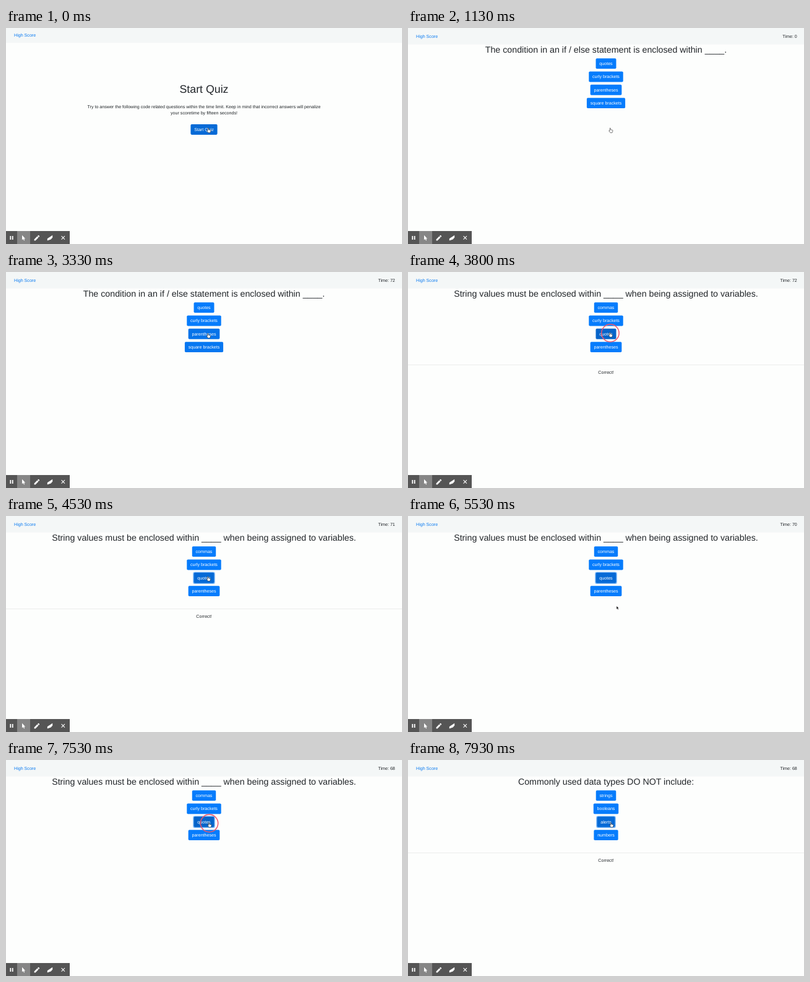
These frames come from a looping animation (640 px wide and 350 px high, 8000 ms). An HTML page:

```html
<!DOCTYPE html>
<html lang="en">
<head>
<meta charset="utf-8">
<title>Quiz</title>
<style>
  html, body { margin: 0; width: 100%; height: 100%; overflow: hidden; background: #fdfefd; }
  svg { display: block; width: 100vw; height: 100vh; }
  text { font: 7.11px "Liberation Sans", Arial, sans-serif; fill: #212529; text-anchor: middle; text-rendering: geometricPrecision; }
  .title { font-size: 17.78px; }
  .question { font-size: 14.22px; }
  .label { fill: #fff; }
  .link { fill: #0b7bf0; text-anchor: start; }
  .end { text-anchor: end; }
</style>
</head>
<body>
<svg id="stage" viewBox="0 0 640 350">
  <rect width="640" height="350" fill="#fdfefd"/>
  <rect id="bar" width="640" height="24" fill="#f4f7f7"/>
  <text id="link" class="link" x="13" y="14.4">High Score</text>
  <text id="timer" class="end" x="628.8" y="15.8"></text>
  <g id="scenes"></g>
  <g id="feedback">
    <rect y="150" width="640" height="1" fill="#ebecec"/>
    <text x="320" y="164.9">Correct!</text>
  </g>
  <g id="toolbar">
    <rect y="329" width="103" height="21" fill="#555"/>
    <rect x="18" y="329" width="21" height="21" fill="#868686"/>
    <g fill="#fff">
      <path d="M6.4 337h1.8v6h-1.8zM9.8 337h1.8v6h-1.8z"/>
      <path d="M26 335.8v7.6l1.8-1.6 1.2 2.8 1.2-.5-1.2-2.7h2.3z"/>
      <path d="M45.6 344.4v-2l4.9-4.9 2 2-4.9 4.9zM51 337l1-1q.5-.4 1 0l1 1q.4.5 0 1l-1 1z"/>
      <path d="M66.8 341.2l8.4-5.4v3.6l-2.6 3-5.8 2.2z"/>
    </g>
    <path d="M89.6 337.2l5.4 5.4M95 337.2l-5.4 5.4" stroke="#fff" stroke-width="1.1"/>
  </g>
  <circle id="halo" r="14.2" fill="none" stroke="#f0566a" stroke-width="1.5"/>
  <g id="cursor" stroke-linejoin="round">
    <path id="arrow" d="M0 0v5.4l1.3-1.1.9 2 1-.4-.9-2h1.7z" fill="#000" stroke="#fff" stroke-width=".5"/>
    <path id="hand" d="M-.7.5q.7-.9 1.3 0v2.2l3 .7q.7.2.6 1l-.5 2.1-.6 1.2H.2L-1.9 5q-.3-.9.5-.9l.7.5z" fill="#fff" stroke="#222" stroke-width=".6"/>
  </g>
</svg>
<script>
const LOOP = 8000, FADE = 150;
const NS = "http://www.w3.org/2000/svg";
const $ = id => document.getElementById(id);

const clicks = [
  { down: 120, up: 280 },
  { down: 3560, up: 3760 },
  { down: 7400, up: 7570 }
];

// [time, x, y] of the pointer tip
const path = [
  [0, 326.8, 162], [2950, 326.8, 162], [3370, 326.3, 97.8], [4650, 326.3, 97.8],
  [5150, 337, 145.8], [6350, 337, 145.8], [6950, 324.5, 85.8], [7100, 324.5, 85.8],
  [7340, 327.9, 101.3], [LOOP, 327.9, 101.3]
];

const clamp = v => Math.min(1, Math.max(0, v));
const smooth = v => v * v * (3 - 2 * v);
const show = (node, on) => node.setAttribute("visibility", on ? "visible" : "hidden");

function add(parent, tag, attrs, content = "") {
  const node = document.createElementNS(NS, tag);
  for (const key in attrs) node.setAttribute(key, attrs[key]);
  node.textContent = content;
  return parent.appendChild(node);
}

function addButton(parent, label, top) {
  const ring = add(parent, "rect", {});
  const face = add(parent, "rect", {});
  const text = add(parent, "text", { class: "label", x: 320, y: top + 10.8 }, label);
  const width = text.getComputedTextLength() + 11.55, left = 320 - width / 2;
  const place = (node, grow) => {
    const box = { x: left - grow, y: top - grow, width: width + 2 * grow, height: 16.9 + 2 * grow, rx: 1.78 + grow };
    for (const key in box) node.setAttribute(key, box[key]);
  };
  place(face, 0);
  place(ring, 1.4);
  ring.setAttribute("fill", "#86bffa");
  const contains = ([x, y]) => x > left && x < left + width && y > top && y < top + 16.9;
  return { ring, face, contains };
}

function addScene(start, end, build) {
  const group = add($("scenes"), "g", {});
  return { start, end, group, buttons: build(group), focus: -1, focusTime: 0 };
}

const addQuestion = (start, end, title, answers) => addScene(start, end, group => {
  add(group, "text", { class: "question", x: 320, y: 40.1 }, title);
  return answers.map((label, i) => addButton(group, label, 49.2 + i * 21.33));
});

const scenes = [
  addScene(0, clicks[0].up, group => {
    add(group, "text", { class: "title", x: 320, y: 104.7 }, "Start Quiz");
    add(group, "text", { x: 320, y: 129.6 }, "Try to answer the following code related questions within the time limit. Keep in mind that incorrect answers will penalize");
    add(group, "text", { x: 320, y: 140.2 }, "your scoretime by fifteen seconds!");
    return [addButton(group, "Start Quiz", 156)];
  }),
  addQuestion(clicks[0].up, clicks[1].up, "The condition in an if / else statement is enclosed within ____.",
    ["quotes", "curly brackets", "parentheses", "square brackets"]),
  addQuestion(clicks[1].up, clicks[2].up, "String values must be enclosed within ____ when being assigned to variables.",
    ["commas", "curly brackets", "quotes", "parentheses"]),
  addQuestion(clicks[2].up, LOOP, "Commonly used data types DO NOT include:",
    ["strings", "booleans", "alerts", "numbers"])
];
// The clicked button keeps its focus when the next question fills in.
for (const i of [2, 3]) Object.assign(scenes[i], { focus: 2, focusTime: scenes[i].start });

function pointerAt(t) {
  const i = Math.max(1, path.findIndex(p => p[0] >= t));
  const [t0, x0, y0] = path[i - 1], [t1, x1, y1] = path[i];
  const k = smooth(clamp((t - t0) / (t1 - t0)));
  return [x0 + (x1 - x0) * k, y0 + (y1 - y0) * k];
}

// Share of the last FADE ms spent over the button.
function hoverLevel(button, t) {
  const samples = 10;
  let hits = 0;
  for (let i = 0; i < samples; i++) {
    if (button.contains(pointerAt(Math.max(0, t - i * FADE / samples)))) hits++;
  }
  return hits / samples;
}

function drawButtons(scene, tip, t) {
  const pressed = clicks.some(c => t >= c.down && t < c.up + 60);
  scene.buttons.forEach((button, i) => {
    const focus = i === scene.focus ? clamp((t - scene.focusTime - 30) / FADE) : 0;
    const press = pressed && button.contains(tip) ? 0.35 : 0;
    const level = Math.max(hoverLevel(button, t), focus) + press;
    button.face.setAttribute("fill", `rgb(6,${124 - 18 * level},${252 - 38 * level})`);
    button.ring.setAttribute("opacity", focus);
  });
}

function haloLevel(t) {
  return Math.max(...clicks.map(c => Math.min(clamp((t - c.down) / 80), clamp((c.up + 210 - t) / 130))));
}

function draw(t) {
  const tip = pointerAt(t);
  const scene = scenes.find(s => t >= s.start && t < s.end);
  const playing = scene !== scenes[0];

  scenes.forEach(s => show(s.group, s === scene));
  drawButtons(scene, tip, t);

  $("bar").setAttribute("height", playing ? 26.6 : 24);
  $("link").setAttribute("y", playing ? 15.8 : 14.4);
  const seconds = Math.floor((t - clicks[0].up) / 1000);
  $("timer").textContent = playing ? "Time: " + (seconds < 1 ? 0 : 75 - seconds) : "";
  show($("feedback"), clicks.slice(1).some(c => t >= c.up && t < c.up + 1000));

  const overButton = t < path[1][0] || scene.buttons.some(b => b.contains(tip));
  show($("hand"), overButton);
  show($("arrow"), !overButton);
  $("cursor").setAttribute("transform", `translate(${tip})`);

  const halo = $("halo");
  halo.setAttribute("cx", tip[0] + 0.6);
  halo.setAttribute("cy", tip[1] + 1.2);
  halo.setAttribute("opacity", haloLevel(t));
}

const begin = performance.now();
function tick() {
  draw((performance.now() - begin) % LOOP);
  requestAnimationFrame(tick);
}
tick();
</script>
</body>
</html>
```
